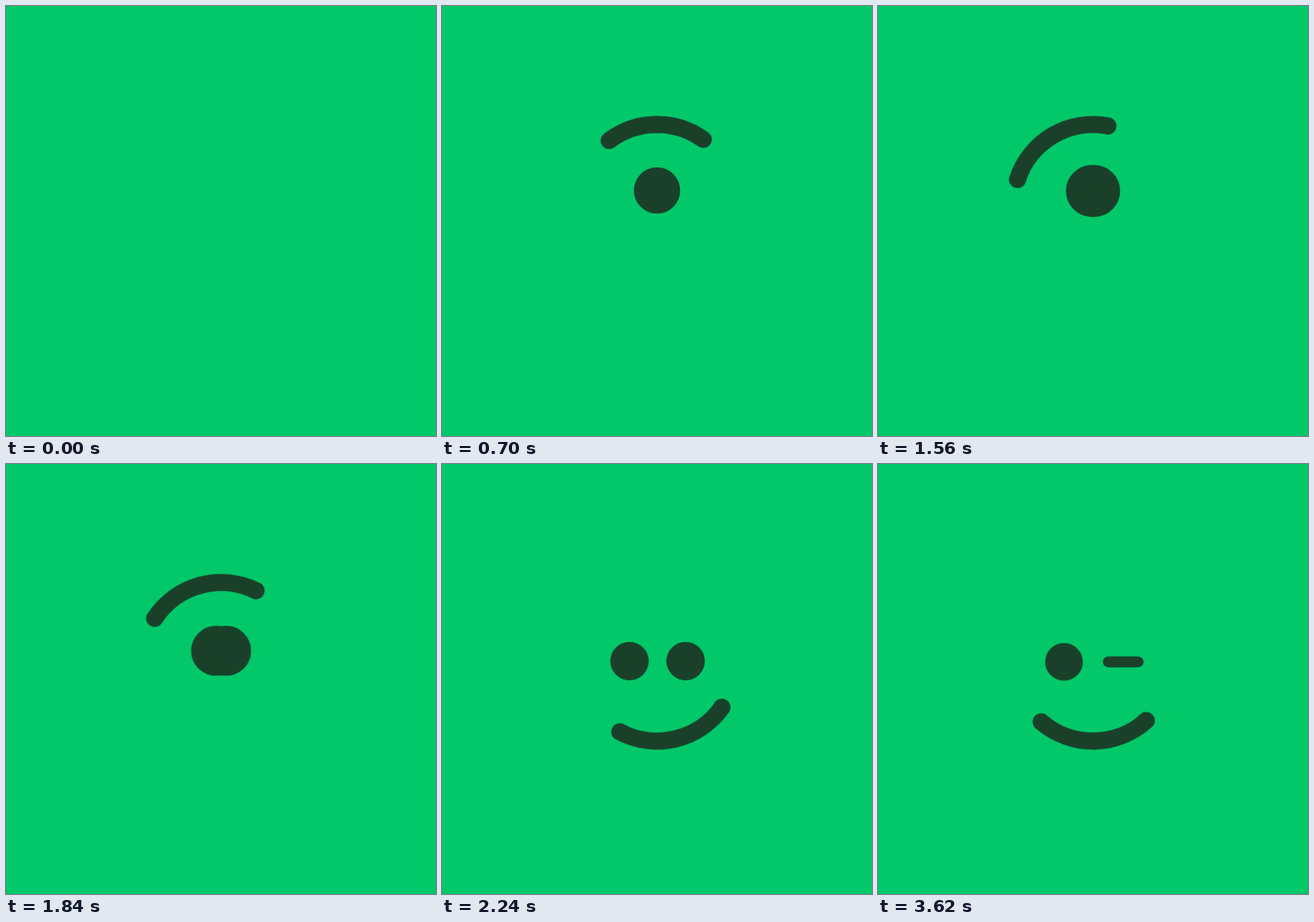
An HTML page that plays this animation: 640x640 px, repeating every 3.64 s.

```html
<!DOCTYPE html>
<html lang="en">
<head>
<meta charset="utf-8">
<title>Wink</title>
<style>
  html, body { margin: 0; width: 100%; height: 100%; overflow: hidden; background: #02c86a; }
  svg { display: block; width: 100vw; height: 100vh; }

  svg * { animation-duration: 3640ms; animation-iteration-count: infinite; animation-timing-function: linear; }

  .face { fill: #1a402a; stroke: #1a402a; animation-name: show; }
  .arc { fill: none; stroke-width: 25.5; stroke-linecap: round; animation-name: spin; }
  .arc path { stroke-dasharray: 1 9; animation-name: draw; }
  .eye { animation-name: eye; }
  .eye ellipse { rx: 27.86px; ry: 27.86px; stroke-width: 22.28; stroke-linejoin: round; }
  .left { --x: 276.8px; }
  .right { --x: 364.9px; }
  .right ellipse { animation-name: wink; }

  @keyframes show {
    0%, 6.03% { visibility: hidden; animation-timing-function: step-end; }
    6.04%, 100% { visibility: visible; }
  }

  /* both halves grow outwards from the top */
  @keyframes draw {
    0%, 5.495% { stroke-dashoffset: 1; animation-timing-function: cubic-bezier(.333, 1, .667, 1); }
    32.967%, 100% { stroke-dashoffset: 0; }
  }

  /* wind up to the left, then swing round to the bottom */
  @keyframes spin {
    0%, 31.593% { transform: translate(320px, 294.4px) rotate(-.7deg); animation-timing-function: cubic-bezier(.37, 0, .63, 1); }
    43.132% { transform: translate(320px, 294.4px) rotate(-30.7deg); animation-timing-function: cubic-bezier(.84, 0, .45, 1); }
    65.934%, 100% { transform: translate(320px, 294.4px) rotate(179.3deg); }
  }

  /* grow as one dot, then split in two */
  @keyframes eye {
    0%, 5.495% { transform: translate(320px, 274.5px) scale(0); animation-timing-function: cubic-bezier(.333, 1, .667, 1); }
    32.967% { transform: translate(320px, 274.5px) scale(1); animation-timing-function: cubic-bezier(1, 0, .58, 1); }
    65.934%, 100% { transform: translate(var(--x), 294.5px) scale(.718); }
  }

  @keyframes wink {
    0%, 82.418% { rx: 27.86px; ry: 27.86px; animation-timing-function: cubic-bezier(.65, 0, .35, 1); }
    97.802% { rx: 27.86px; ry: .3px; animation-timing-function: ease-out; }
    99.451%, 100% { rx: 30.99px; ry: .3px; }
  }
</style>
</head>
<body>
<svg viewBox="0 0 640 640">
  <g class="face">
    <g class="arc">
      <path pathLength="1" d="M0-118A118 118 0 0 1 78.2-88.4"/>
      <path pathLength="1" d="M0-118A118 118 0 0 0-78.2-88.4"/>
    </g>
    <g class="eye left"><ellipse/></g>
    <g class="eye right"><ellipse/></g>
  </g>
</svg>
</body>
</html>
```
